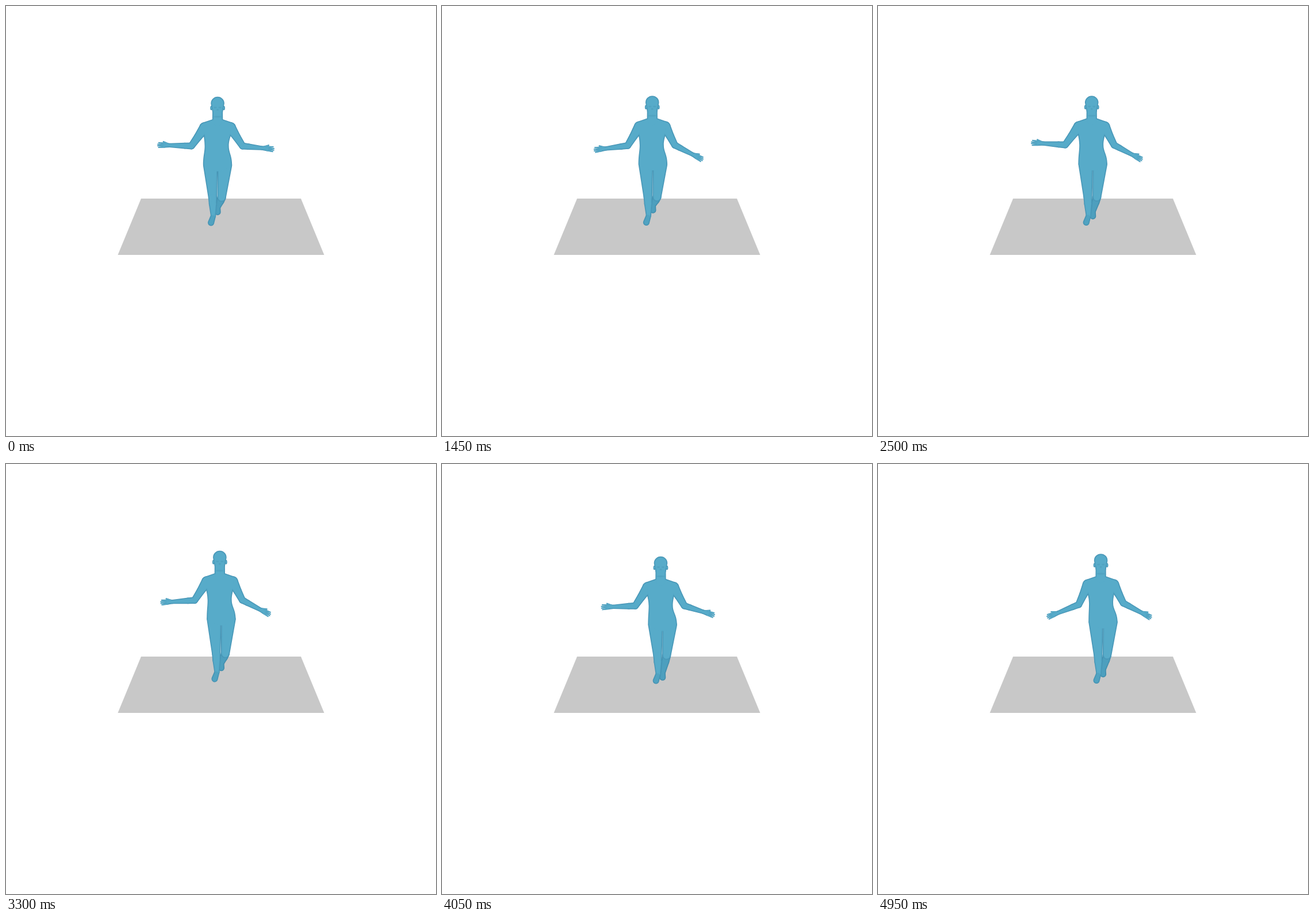
An HTML page with a canvas for the animation above (5 s loop, 748x748 px).

```html
<!DOCTYPE html>
<html lang="en">
<head>
<meta charset="utf-8">
<title>Dancing figure</title>
<style>
html, body { margin: 0; width: 100%; height: 100%; overflow: hidden; background: #fff; }
canvas { display: block; }
</style>
</head>
<body>
<canvas id="stage" width="748" height="748"></canvas>
<script>
const ctx = document.getElementById('stage').getContext('2d');
const LOOP = 5000, STEP = 50, HOP = 425, SWAY = 1750;

const frontTones = ['#4794b4', '#4fa1c1', '#57abc9'];
const backTones = ['#418cab', '#4797b7', '#4d9fbe'];
const shade = 'rgba(50,125,155,.16)';

const mix = (a, b, u) => a + (b - a) * u;
const between = (a, b, u) => [mix(a[0], b[0], u), mix(a[1], b[1], u)];
const thin = (r, inset) => Math.max(r - inset, r * 0.55);
const bump = (t, centre, width) => Math.exp(-(((t - centre) / width) ** 2));
const wave = (t, peak, period) => (1 + Math.cos(2 * Math.PI * (t - peak) / period)) / 2;

function poseAt(t) {
  const u = t / LOOP, sway = wave(t, 1450, SWAY);

  // Small hops that start weak and are highest past the middle of the loop.
  const height = 9 - 9 * bump(t, 100, 450) - 4 * bump(t, 2560, 250) + 8 * bump(t, 3550, 400);
  const top = 160.5 - 3.4 * sway - height * wave(t, 12.5, HOP);
  const lift = Math.max(0, 157 - top) / 2;

  // Slow drift to the right with a little wandering.
  const head = 368 + 20 * u * u + 3 * bump(t, 650, 350) - 4 * bump(t, 1500, 400) - 5 * bump(t, 3200, 600);
  const hip = head + 4 * u;

  // Downward slope of the forearms in degrees.
  const left = -4 + 21 * bump(t, 950, 650) + 10 * bump(t, 3600, 600) + 26 * bump(t, 5000, 500);
  const right = 28 - 22 * Math.exp(-t / 300) - 10 * bump(t, 4050, 250);

  return {
    top, lift, head, hip,
    arms: [
      makeArm(-1, left, [head - 45 + 0.3 * left, top + 86 + 0.12 * left], 38),
      makeArm(1, right, [head + 44.5 - 0.19 * right, top + 86], 34)
    ],
    frontToe: [hip - 11.5, 382 - lift],
    backToe: [hip, 371.5 - 11 * sway + 11 * u ** 4 - lift]
  };
}

function makeArm(side, slope, elbow, length) {
  const a = slope * Math.PI / 180;
  const wrist = [elbow[0] + side * length * Math.cos(a), elbow[1] + length * Math.sin(a)];
  return { side, elbow, wrist };
}

function disc(x, y, rx, ry) {
  ctx.beginPath();
  ctx.ellipse(x, y, rx, ry, 0, 0, 2 * Math.PI);
  ctx.fill();
}

// A tapered limb with round ends.
function limb(a, ra, b, rb, inset = 0) {
  ra = thin(ra, inset);
  rb = thin(rb, inset);
  const ang = Math.atan2(b[1] - a[1], b[0] - a[0]), q = Math.PI / 2;
  ctx.beginPath();
  ctx.arc(a[0], a[1], ra, ang + q, ang + 3 * q);
  ctx.arc(b[0], b[1], rb, ang - q, ang + q);
  ctx.fill();
}

const kneeOf = (p, side) => [p.hip + (side < 0 ? -8.7 : 7), 333 - p.lift];

function thigh(p, side, inset) {
  limb([p.hip + side * 12.4, p.top + 120], 12.7, kneeOf(p, side), 7.6, inset);
}

function shank(p, side, toe, inset) {
  const knee = kneeOf(p, side);
  const ankle = side < 0 ? [toe[0] + 4, toe[1] - 17] : [toe[0] + 0.5, toe[1] - 13];
  const calf = between(knee, ankle, 0.35);
  limb(knee, 7.6, calf, 7, inset);
  limb(calf, 7, ankle, 4.6, inset);
  limb(ankle, 4.6, [toe[0], toe[1] - 5], 5.6, inset);
}

function hand({ side, elbow, wrist }, inset) {
  ctx.save();
  ctx.translate(...wrist);
  ctx.rotate(Math.atan2(wrist[1] - elbow[1], wrist[0] - elbow[0]));
  limb([0, 0], 3.6, [8, 0], 4.4, inset);
  for (let f = -1.5; f <= 1.5; f++) {
    limb([9, f * 2], 1.6, [21.5 - Math.abs(f) * 1.6, f * 2.8], 1, inset);
  }
  limb([3, side * -2], 1.9, [11, side * -6], 1.2, inset);
  ctx.restore();
}

function arm(p, a, inset) {
  const shoulder = [p.head + a.side * 22.5, p.top + 54];
  const bicep = between(shoulder, a.elbow, 0.5);
  const forearm = between(a.elbow, a.wrist, 0.3);
  limb([p.head + a.side * 7, p.top + 45], 6, shoulder, 9.5, inset);
  limb(shoulder, 9.5, bicep, 7.2, inset);
  limb(bicep, 7.2, a.elbow, 6, inset);
  limb(a.elbow, 6, forearm, 5.4, inset);
  limb(forearm, 5.4, a.wrist, 3.7, inset);
  hand(a, inset);
}

// Shoulders, waist and hips joined by smooth flanks.
function trunk(p, inset) {
  const y = n => p.top + n;
  const chest = 25.5 - inset, waist = 21 - inset, hips = 25.2 - inset;
  const mid = mix(p.head, p.hip, 0.5) - 1.5;
  ctx.beginPath();
  ctx.moveTo(p.head - chest, y(50));
  ctx.bezierCurveTo(p.head - chest, y(68), mid - waist, y(72), mid - waist, y(86));
  ctx.bezierCurveTo(mid - waist, y(98), p.hip - hips, y(102), p.hip - hips, y(120));
  ctx.quadraticCurveTo(p.hip, y(140), p.hip + hips, y(120));
  ctx.bezierCurveTo(p.hip + hips, y(102), mid + waist, y(98), mid + waist, y(86));
  ctx.bezierCurveTo(mid + waist, y(72), p.head + chest, y(68), p.head + chest, y(50));
  ctx.quadraticCurveTo(p.head, y(36), p.head - chest, y(50));
  ctx.fill();
}

function head({ head: x, top: y }, inset) {
  for (const s of [-1, 1]) disc(x + s * 11, y + 20, thin(1.9, inset), thin(3.8, inset));
  limb([x, y + 12], 11.8, [x, y + 24], 9.6, inset);
  limb([x, y + 24], 9, [x, y + 44], 9.2, inset);
}

function shading(p) {
  ctx.fillStyle = shade;
  for (const s of [-1, 1]) disc(p.head + s * 4, p.top + 19, 2.6, 1.4);
  disc(p.head, p.top + 23, 2, 1.5);
  disc(p.head, p.top + 35, 7, 1.6);
  const [x, y] = p.frontToe;
  limb([x + 3, y - 14], 4, [x, y - 5], 5);
}

function floor() {
  ctx.fillStyle = '#c8c8c8';
  ctx.beginPath();
  ctx.moveTo(235, 335);
  ctx.lineTo(513, 335);
  ctx.lineTo(553.5, 433);
  ctx.lineTo(194.5, 433);
  ctx.fill();
}

// Each tone sits a little further inside the outline.
function layered(tones, paint) {
  tones.forEach((tone, i) => {
    ctx.fillStyle = tone;
    paint(i);
  });
}

function draw(t) {
  const p = poseAt(t);
  ctx.fillStyle = '#fff';
  ctx.fillRect(0, 0, 748, 748);
  floor();
  layered(backTones, inset => shank(p, 1, p.backToe, inset));
  layered(frontTones, inset => {
    thigh(p, 1, inset);
    thigh(p, -1, inset);
    shank(p, -1, p.frontToe, inset);
    p.arms.forEach(a => arm(p, a, inset));
    trunk(p, inset);
    head(p, inset);
  });
  shading(p);
}

function tick() {
  const t = performance.now() % LOOP;
  draw(Math.floor(t / STEP) * STEP);
  requestAnimationFrame(tick);
}
tick();
</script>
</body>
</html>
```
